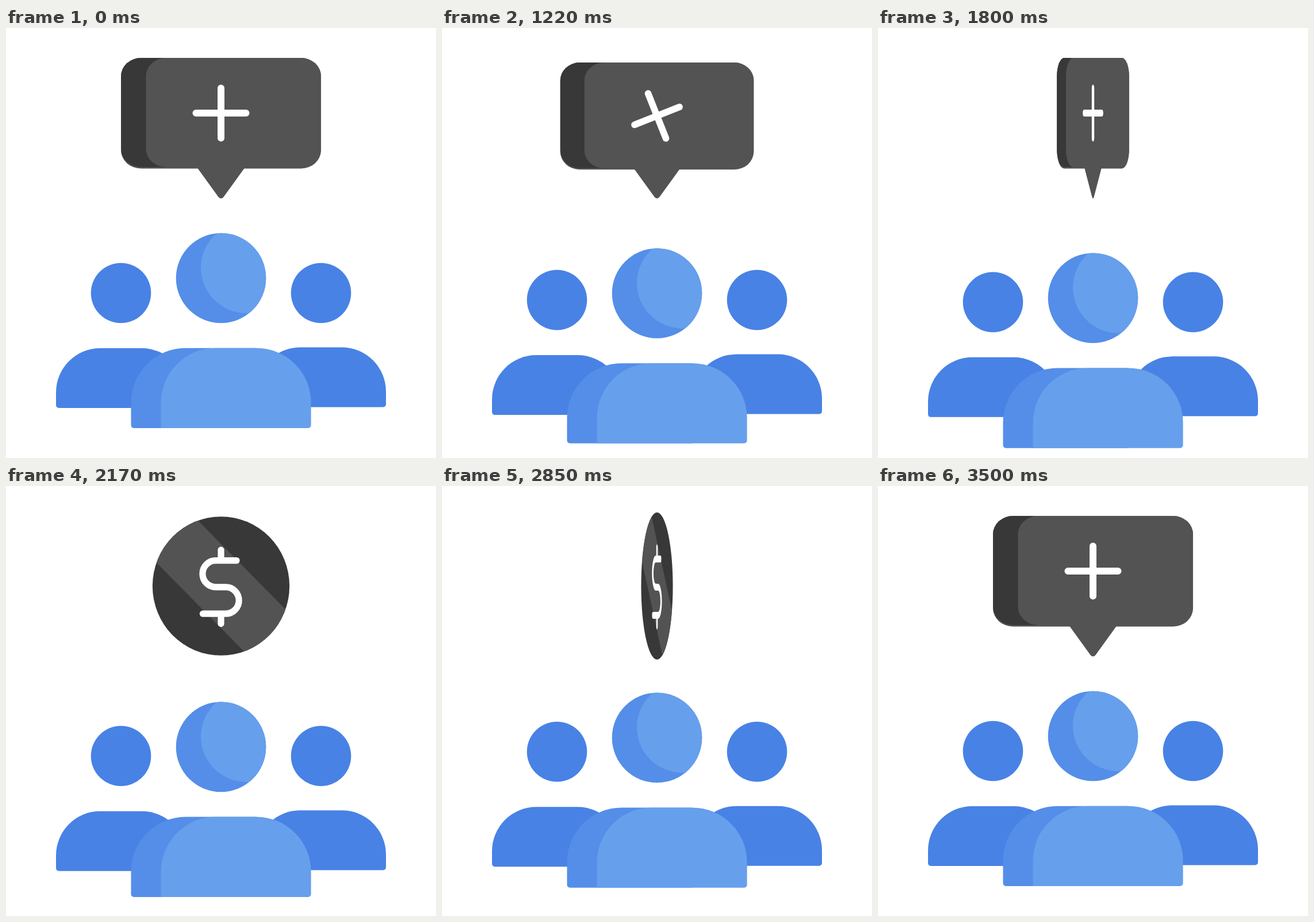
An HTML page for the animation above (3.52 s loop, 748 by 748 pixels).

```html
<!DOCTYPE html>
<html lang="en">
<head>
<meta charset="utf-8">
<title>Team growth</title>
<style>
  html, body { margin: 0; width: 100%; height: 100%; overflow: hidden; background: #fff; }
  svg { display: block; width: 100vw; height: 100vh; }
  .side { fill: #4882e5; }
  .mid { fill: #548ee8; }
  .light { fill: #669fec; }
  .dark { fill: #383838; }
  .grey { fill: #535353; }
  .sign { fill: none; stroke: #fff; stroke-width: 12; stroke-linecap: round; }
</style>
</head>
<body>
<svg viewBox="0 0 748 748">
  <defs>
    <clipPath id="face"><circle cx="374" cy="435" r="78.3"/></clipPath>
    <clipPath id="disc"><circle r="128"/></clipPath>
  </defs>

  <g id="sides" class="side">
    <circle cx="200" cy="461" r="52.3"/>
    <path d="M87 634a77 77 0 0 1 77 -77h72a77 77 0 0 1 77 77v27H92a5 5 0 0 1 -5 -5z"/>
    <circle cx="548" cy="461" r="52.3"/>
    <path d="M661 632.5a77 77 0 0 0 -77 -77h-72a77 77 0 0 0 -77 77v27H656a5 5 0 0 0 5 -5z"/>
  </g>

  <g id="leader">
    <circle class="mid" cx="374" cy="435" r="78.3"/>
    <circle class="light" cx="418" cy="417" r="79" clip-path="url(#face)"/>
    <path class="mid" d="M217.5 652a95 95 0 0 1 95 -95.3h123v139.3H222.500a5 5 0 0 1 -5 -5z"/>
    <path class="light" d="M269.600 652a95 95 0 0 1 95 -95.3h71a95 95 0 0 1 95 95.300v39a5 5 0 0 1 -5 5H269.600z"/>
  </g>

  <!-- The bubble is drawn around the tip of its tail -->
  <g id="bubble">
    <rect class="grey" x="-174" y="-244.500" width="348" height="192.500" rx="35" ry="32"/>
    <rect class="dark" x="-174" y="-244.500" width="150" height="190" rx="35" ry="32"/>
    <rect class="grey" x="-130.500" y="-244.500" width="304.500" height="190" rx="35" ry="32"/>
    <path class="grey" d="M-41 -53L-4.500 -2.500Q0 2.500 4.500 -2.500L41 -53z"/>
    <path id="plus" class="sign" d="M-43.500 0H43.500M0 -43.500V43.500"/>
  </g>

  <g id="coin">
    <circle class="dark" r="128"/>
    <path d="M-130 -130L130 130" stroke="#535353" stroke-width="109.7" clip-path="url(#disc)"/>
    <path class="sign" d="M29 -47H-10a24.500 24.500 0 0 0 0 49H9a24.500 24.500 0 0 1 0 49H-34M0 -66.500V-47M0 51V69.500"/>
  </g>
</svg>
<script>
const LOOP = 3520;
const part = id => document.getElementById(id);
const [sides, leader, bubble, plus, coin] = ['sides', 'leader', 'bubble', 'plus', 'coin'].map(part);

const progress = (t, from, to) => Math.min(1, Math.max(0, (t - from) / (to - from)));
const mix = (a, b, u) => a + (b - a) * u;
const sine = u => (1 - Math.cos(Math.PI * u)) / 2;

// Cubic bezier easing with flat ends: (x1, 0, x2, 1)
function ease(u, x1, x2) {
  let lo = 0, hi = 1;
  for (let i = 0; i < 24; i++) {
    const s = (lo + hi) / 2, r = 1 - s;
    if (3 * s * r * r * x1 + 3 * s * s * r * x2 + s * s * s < u) lo = s; else hi = s;
  }
  return lo * lo * (3 - 2 * lo);
}

// Quick dip, swell, then settle
function pulse(t) {
  if (t < 80) return mix(1, 0.926, progress(t, 0, 80));
  if (t < 480) return mix(0.926, 1.074, sine(progress(t, 80, 480)));
  return mix(1.074, 1, sine(progress(t, 480, 740)));
}

const flipOut = t => 1 - sine(progress(t, 515, 1000));
const flipIn = t => sine(progress(t, 0, 185));

function place(node, y, scaleX, scaleY) {
  node.setAttribute('transform', `translate(374 ${y}) scale(${scaleX} ${scaleY})`);
}

function draw(t) {
  const drop = t < 1500
    ? 38 * ease(progress(t, 1000, 1500), 0.333, 0.23)
    : 38 * (1 - ease(progress(t, 1500, 3500), 0.35, 0.208));
  leader.setAttribute('transform', `translate(0 ${drop})`);
  sides.setAttribute('transform', `translate(0 ${drop * 0.457})`);

  const coinTurn = t >= 2000 && t < 3000;
  bubble.style.display = coinTurn ? 'none' : '';
  coin.style.display = coinTurn ? '' : 'none';

  if (coinTurn) {
    const size = pulse(t - 2000);
    place(coin, 174, size * flipIn(t - 2000) * flipOut(t - 2000), size);
  } else {
    const size = pulse(t - 1000);
    const turn = t < 2000 ? flipOut(t - 1000) : flipIn(t - 3000);
    place(bubble, 296.500, size * turn, size);
    const angle = 90 * ease(progress(t, 1000, 1500), 0.18, 0.2);
    plus.setAttribute('transform', `translate(0 -148.500) rotate(${angle})`);
  }
}

const start = performance.now();
function tick() {
  draw((performance.now() - start) % LOOP);
  requestAnimationFrame(tick);
}
tick();
</script>
</body>
</html>
```
